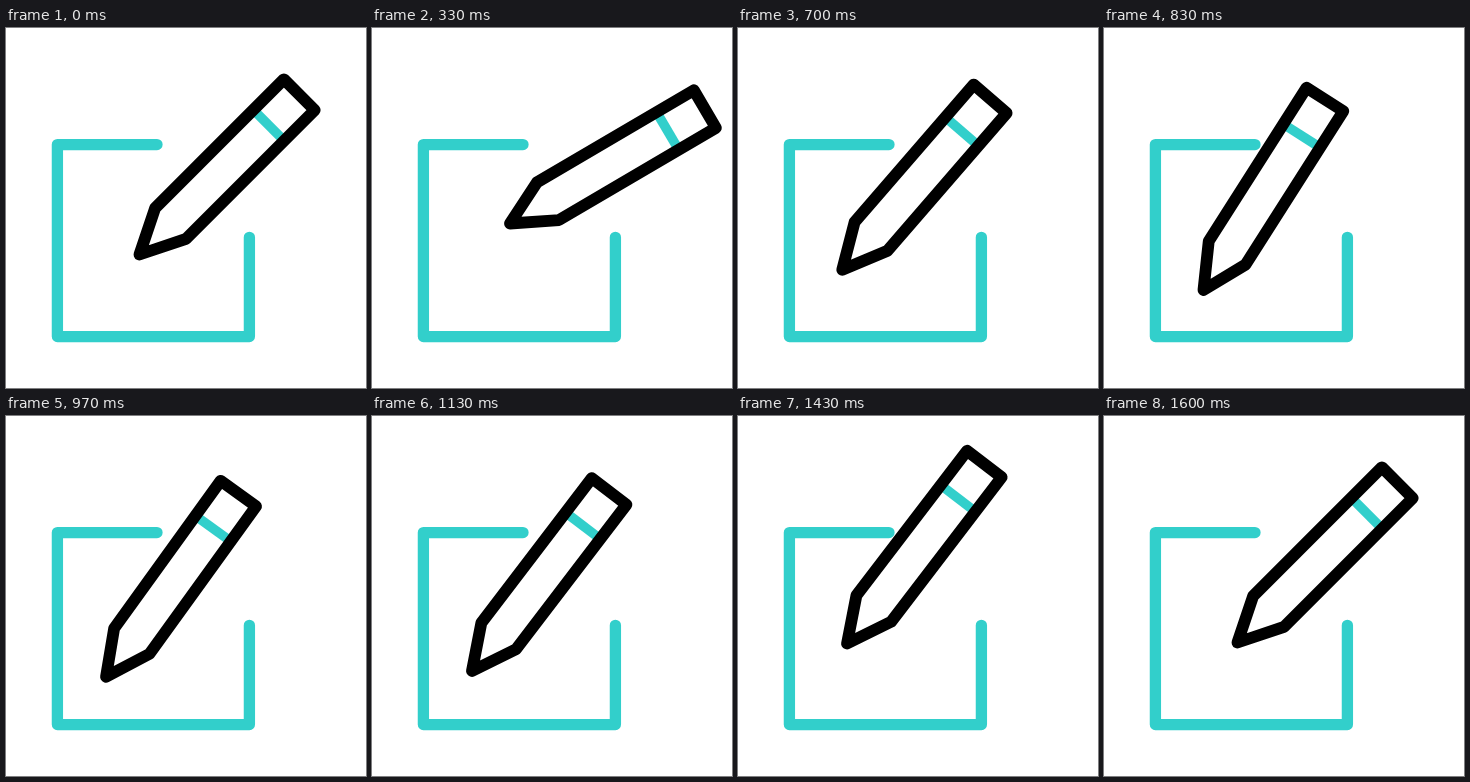
These frames come from a looping animation (360 px wide and 360 px high, 2 s). An HTML page:

```html
<!DOCTYPE html>
<html lang="en">
<head>
<meta charset="utf-8">
<title>Edit icon</title>
<style>
  html, body { margin: 0; width: 100%; height: 100%; overflow: hidden; background: #fff; }
  svg { display: block; width: 100vw; height: 100vh; }
  path { fill: none; stroke-width: 11.3; stroke-linejoin: round; }
  .teal { stroke: #32cfcb; }
  .ink { stroke: #000; stroke-width: 11.8; }
  .round { stroke-linecap: round; }
  .band { stroke-width: 9.6; }
</style>
</head>
<body>
<svg viewBox="0 0 360 360">
  <path class="teal round" d="M151 116.6H51.4V308.6H243.4V209.3"/>
  <!-- the pencil lies along +x with its tip at the origin -->
  <g id="pencil">
    <path class="teal band" d="M182.8 -22V22"/>
    <path class="ink" d="M0 0L44 -21.8H226V21.8H44Z"/>
  </g>
</svg>
<script>
  const LOOP = 2000;
  const REST = { x: 133.5, y: 226.5, tilt: 45 };

  // Each stroke ends at step `end` in the given pose; `bow` bends its path sideways
  const STROKES = [
    { end: 13.5, x: 138.9, y: 189.3, tilt: 27.5 },
    { end: 25, x: 99.5, y: 262, tilt: 57.5, bow: -7 },
    { end: 32, x: 100.4, y: 260, tilt: 52 },
    { end: 40, x: 97.7, y: 228, tilt: 56.1 },
    { end: 48, ...REST }
  ];

  const pencil = document.getElementById('pencil');
  const ease = u => u * u * (3 - 2 * u);

  function poseAt(step) {
    let from = { end: 0, ...REST };
    for (const to of STROKES) {
      if (step < to.end) {
        const u = (step - from.end) / (to.end - from.end);
        const mix = key => from[key] + (to[key] - from[key]) * ease(u);
        const bend = (to.bow || 0) * Math.sin(Math.PI * u);
        return { x: mix('x') + bend, y: mix('y'), tilt: mix('tilt') };
      }
      from = to;
    }
    return REST;
  }

  // Thirty steps a second, falling on 0, 30 and 70 ms of each 100
  function stepAt(t) {
    const r = t % 100;
    return Math.floor(t / 100) * 3 + (r >= 70 ? 2 : r >= 30 ? 1 : 0);
  }

  function draw(now) {
    const { x, y, tilt } = poseAt(stepAt(now % LOOP));
    pencil.setAttribute('transform', `translate(${x} ${y}) rotate(${-tilt})`);
  }

  let start;
  function tick(now) {
    if (start === undefined) start = now;
    draw(now - start);
    requestAnimationFrame(tick);
  }

  draw(0);
  requestAnimationFrame(tick);
</script>
</body>
</html>
```
